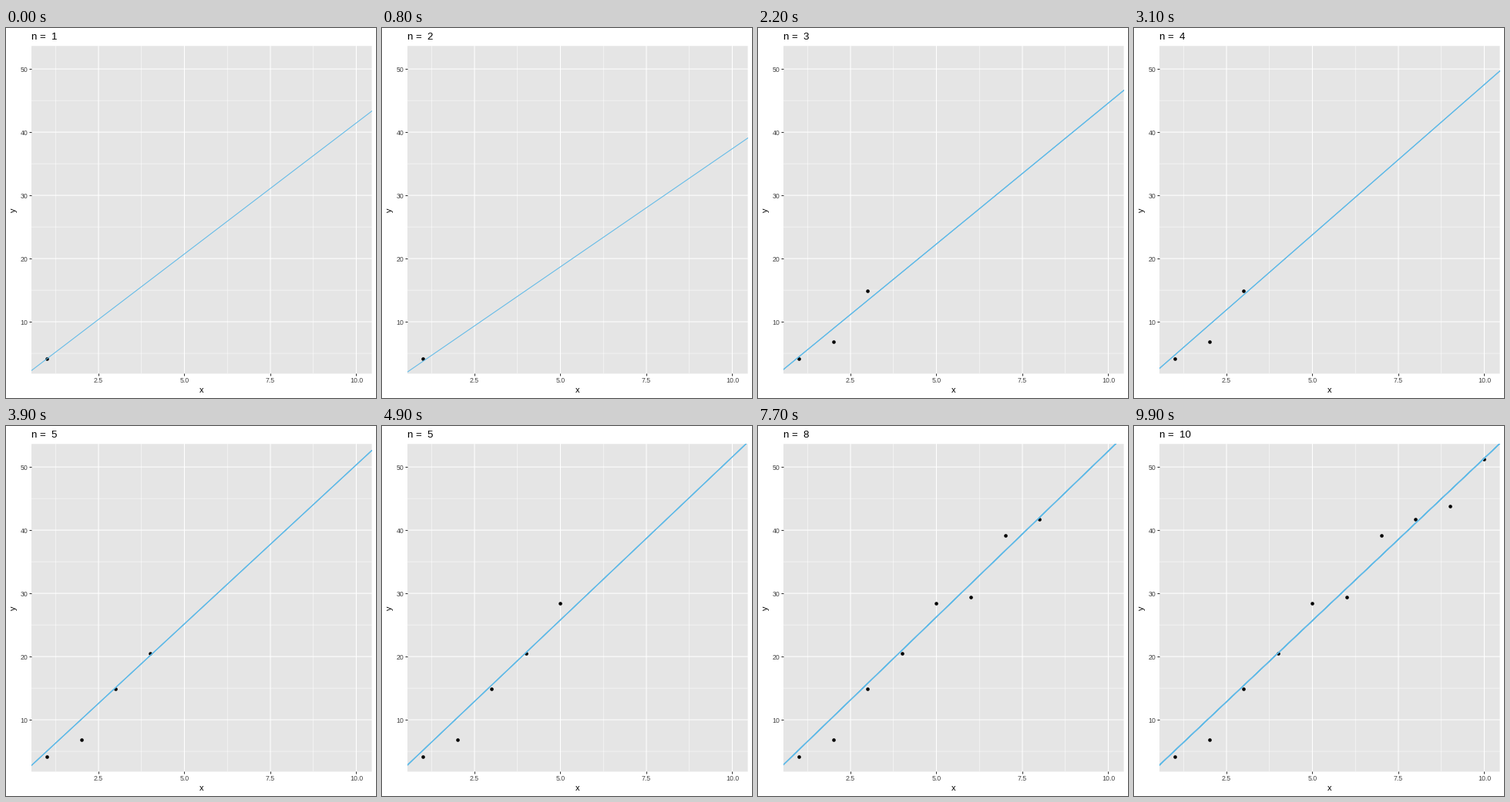
These frames come from a looping animation (480 by 480 pixels, 10000 ms). A matplotlib script:

```python
import numpy as np
import matplotlib.pyplot as plt
from matplotlib.animation import FuncAnimation

plt.rcParams["font.family"] = "Liberation Sans"
plt.rcParams["path.snap"] = False

SIZE, DPI = 480, 72  # at 72 dpi one point is one pixel
STEPS = 11           # frames from one sample size to the next
FRAMES = 100

x = np.arange(1, 11)
y = np.array([4.146, 6.89, 14.84, 20.52, 28.45, 29.45, 39.18, 41.7, 43.78, 51.28])
# least-squares slope through the origin for the first n points
slopes = np.cumsum(x * y) / np.cumsum(x * x)


def padded(v):
    pad = 0.05 * (v.max() - v.min())
    return v.min() - pad, v.max() + pad


fig = plt.figure(figsize=(SIZE / DPI, SIZE / DPI), dpi=DPI, facecolor="white")
left, right, top, bottom = 33.03, 474.52, 23.3, 448.4
ax = fig.add_axes([left / SIZE, 1 - bottom / SIZE,
                   (right - left) / SIZE, (bottom - top) / SIZE])
ax.set(xlim=padded(x), ylim=padded(y), facecolor="#e5e5e5")
ax.spines[:].set_visible(False)
ax.set_axisbelow(True)

ax.set_xticks([2.5, 5, 7.5, 10], ["2.5", "5.0", "7.5", "10.0"])
ax.set_yticks([10, 20, 30, 40, 50])
ax.set_xticks([1.25, 3.75, 6.25, 8.75], minor=True)
ax.set_yticks([5, 15, 25, 35, 45], minor=True)
ax.tick_params(which="major", length=2.75, width=1.07, pad=2.2,
               color="#333333", labelsize=8.8, labelcolor="#444444")
ax.tick_params(which="minor", length=0)
ax.grid(which="major", color="white", lw=1.07)
ax.grid(which="minor", color="white", lw=0.53)


def label(px, py, text, size, **kw):
    return fig.text(px / SIZE, 1 - py / SIZE, text, fontsize=size,
                    color="black", va="baseline", **kw)


title = label(33, 15, "", 13.2)
label((left + right) / 2, 473, "x", 11, ha="center")
label(13, (top + bottom) / 2, "y", 11, ha="center",
      rotation=90, rotation_mode="anchor")

dots, = ax.plot([], [], "o", color="black", ms=4.6, mew=0, zorder=3)
# one line per visible point: stacked edges make the stroke look heavier
fits = [ax.plot([], [], color="#62bbe8", lw=1.07, zorder=4)[0] for _ in x]
ends = np.array(ax.get_xlim())


def draw(i):
    t = 1 + i / STEPS
    n = 1 + i // STEPS
    title.set_text(f"n =  {round(t)}")
    dots.set_data(x[:n], y[:n])
    slope = np.interp(t, x, slopes)
    for k, fit in enumerate(fits):
        fit.set_data(ends, slope * ends)
        fit.set_visible(k < n)
    return [title, dots, *fits]


anim = FuncAnimation(fig, draw, frames=FRAMES, interval=100, repeat=True)
plt.show()
```
